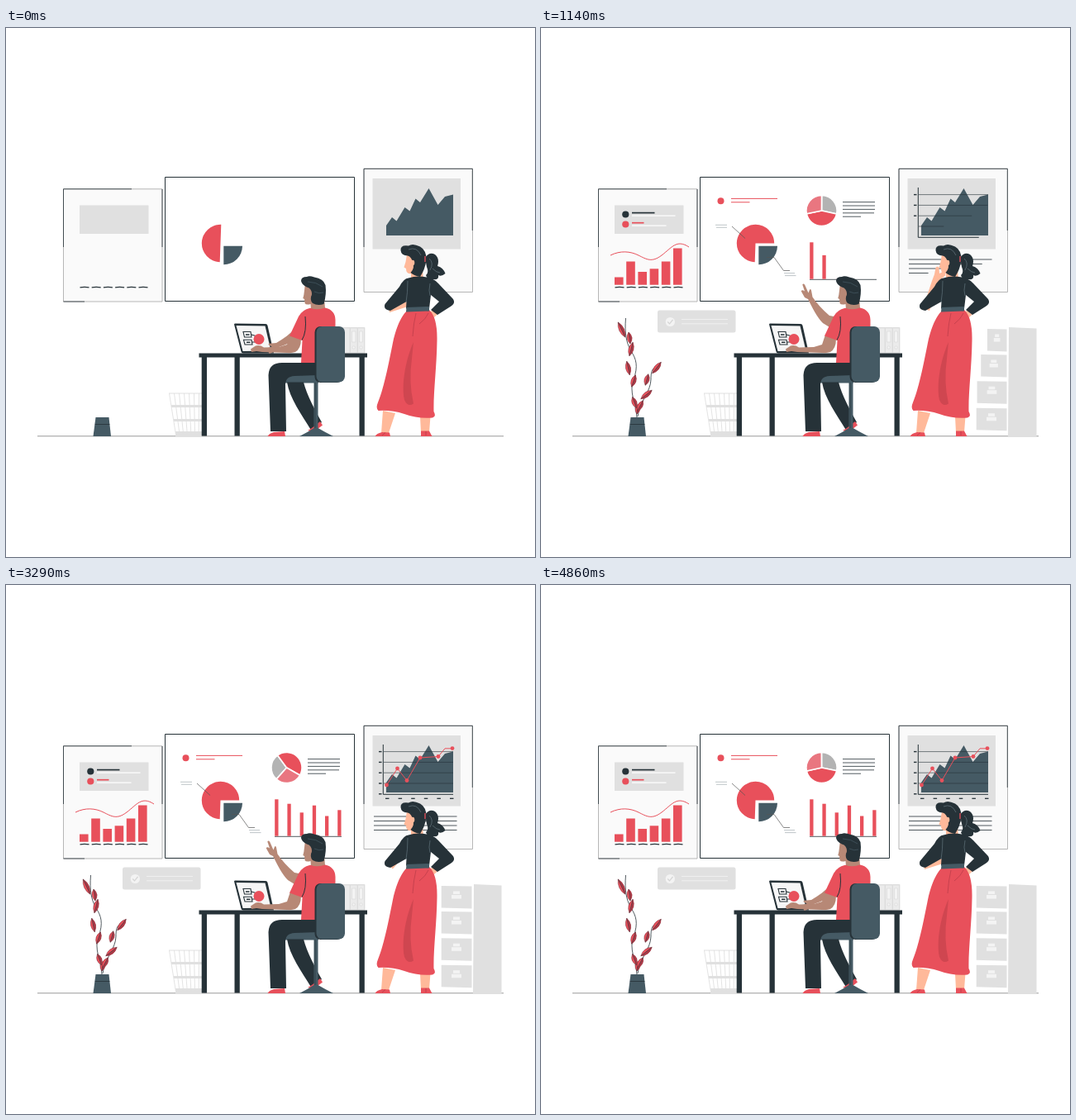
An HTML page for the animation above (4930 ms loop, 640x640 px).

```html
<!DOCTYPE html>
<html lang="en">
<head>
<meta charset="utf-8">
<title>Team reviewing charts</title>
<style>
html, body { margin: 0; width: 100%; height: 100%; overflow: hidden; background: #fff; }
svg { display: block; width: 100%; height: 100%; }
[data-fx] { transform-box: fill-box; }
[data-fx^=pop] { transform-origin: 50% 50%; }
[data-fx^=up] { transform-origin: 50% 100%; }
[data-fx^=right] { transform-origin: 0 50%; }
[data-fx^=left] { transform-origin: 100% 50%; }
.red { fill: #e8505b; } .ink { fill: #263238; } .slate { fill: #455a64; }
.grey { fill: #e0e0e0; } .pale { fill: #f3f3f3; } .skin { fill: #b78876; } .peach { fill: #ffb99a; }
.l { fill: none; stroke: #263238; stroke-width: .8; }
.lr { fill: none; stroke: #e8505b; stroke-width: 1; }
.lw { fill: none; stroke: #fff; stroke-width: 1.2; }
.lg { fill: none; stroke: #a3acb0; stroke-width: .7; }
</style>
</head>
<body>
<svg viewBox="0 0 640 640">
  <path d="M38 493.8H602" stroke="#9b9b9b" stroke-width="1"/>

  <g id="leftPoster">
    <path d="M69.5 194.8H189V331H69.5Z" fill="#fafafa" stroke="#a5a5a5" stroke-width=".8"/>
    <path class="l" d="M69.5 265V194.8H152M189 195V265M69.5 331H95"/>
    <path class="grey" d="M89 214.5H172.5V249H89Z"/>
    <circle class="ink" cx="102.3" cy="225.5" r="4.1" data-fx="pop 150 350"/>
    <path class="l" style="stroke-width:1.7" d="M110 223.6H137.5" data-fx="draw 250 500"/>
    <path class="lw" d="M110 227.2H162.5" data-fx="draw 480 800"/>
    <circle class="red" cx="102.3" cy="237.5" r="4.1" data-fx="pop 500 750"/>
    <path class="lr" style="stroke-width:1.7" d="M110 235.7H124.5" data-fx="draw 640 850"/>
    <path class="lw" d="M110 239.2H151.5" data-fx="draw 740 1060"/>
    <path class="lr" d="M84 275C96 269 108 270 118 275S134 284 146 275S164 255 179 265" data-fx="draw 60 680"/>
  </g>

  <g id="board">
    <path d="M192.5 180.5H421.5V330.5H192.5Z" fill="#fff" stroke="#263238"/>
    <circle class="red" cx="217.5" cy="209.3" r="4" data-fx="pop 70 300"/>
    <path class="lr" d="M230 206.4H286" data-fx="draw 100 480"/>
    <path class="lr" d="M230 210.8H252.5" data-fx="draw 200 480"/>
    <path class="red" id="bigPie"/>
    <path class="slate" d="M263.3 263.8H286A22.6 22.6 0 0 1 263.3 286.2Z"/>
    <path class="lg" style="stroke:#555" d="M247 254.5L231 240" data-fx="draw 640 900"/>
    <path class="lg" d="M225 238.3H211" data-fx="draw 800 1050"/>
    <path class="lg" d="M225 241.3H212" data-fx="draw 850 1100"/>
    <path class="lg" style="stroke:#555" d="M273 277.5H282L293.5 293.5H301" data-fx="draw 640 950"/>
    <path class="lg" d="M294 296.6H307" data-fx="draw 800 1050"/>
    <path class="lg" d="M295 299.6H308.500" data-fx="draw 850 1100"/>
    <g id="pie" stroke="#fff" stroke-width="1.7"></g>
    <path class="l" d="M325 304.3H406" data-fx="draw 150 640"/>
  </g>

  <g id="rightPoster">
    <path d="M433 170.3H564.500V319.500H433Z" fill="#fafafa" stroke="#a5a5a5" stroke-width=".8"/>
    <path class="l" d="M433 265V170.300H564.300V245"/>
    <path class="grey" d="M443.500 182H550V267.500H443.500Z"/>
    <path class="slate" d="M460 251V239L467 229L472.500 233.500L482.500 217L488.500 221.500L495.500 206.500L501 211L511.500 194L522.500 214L531 204L541 201.500V251Z"/>
    <path class="l" style="stroke-width:1" d="M456.300 193V253.300" data-fx="draw 700 1000"/>
    <path class="l" style="stroke-width:1" d="M456.300 253.300H541" data-fx="draw 800 1250"/>
  </g>

  <g data-fx="right 70 620">
    <rect class="grey" x="141" y="341.500" width="94.500" height="27" rx="2.500"/>
    <circle cx="156.300" cy="355.500" r="5.600" class="pale"/>
    <path d="M153.300 355.500L155.500 357.800L159.500 353" fill="none" stroke="#d5d5d5" stroke-width="1.200"/>
    <path d="M170 352.500H226M170 357.800H226" stroke="#efefef" stroke-width="1"/>
  </g>

  <path class="grey" d="M566 362L599.500 363.500V494.500H565Z" data-fx="up 400 1000"/>
  <g id="drawers"></g>

  <g id="bin" fill="none" stroke="#e0e0e0"></g>

  <g id="plant">
    <path class="l" d="M116 471C115 455 106 440 112 425C118 409 115 400 109 391C103 380 101 370 102.500 351" data-fx="draw 0 720"/>
    <path class="l" d="M117 470C119 452 133 440 133 425S137 413 142 406" data-fx="draw 100 680"/>
  </g>
  <path class="slate" d="M108.500 471H124.500L127 494H105.500Z"/>
  <path d="M107.800 479.500H125.400" stroke="#263238" stroke-width=".8"/>

  <g id="desk">
    <g class="pale" stroke="#dadada" stroke-width=".7">
      <path class="grey" d="M404 362.500H434V393H404Z"/>
      <path d="M406 363H416V393H406ZM416.500 363H425V393H416.500ZM425.500 363H433.500V393H425.500Z" fill="#ebebeb"/>
      <path d="M418.500 367H423V380H418.500ZM427.500 367H431.500V380H427.500Z"/>
      <circle cx="420.700" cy="386.500" r="1.700"/><circle cx="429.500" cy="386.500" r="1.700"/>
    </g>
    <path class="ink" d="M233.500 393.500H437V398.500H433.800V493.500H427.500V398.500H282.800V493.500H276.500V398.500H243V493.500H236.700V398.500H233.500Z"/>
    <path class="ink" d="M276 358.500Q276 357.500 277.500 357.500L314 358Q316 358 316.500 360L324 393.500H287Q285 393.500 284.500 391.500Z"/>
    <path d="M278.500 360L313.500 360.500L320.500 390.500L286.500 391Z" fill="#f6f6f6"/>
    <path class="l" d="M287 367.500H296L297 374H288.500ZM287.500 377.300H297L298 383H289ZM297 371L302 372.500M298 380H302" style="stroke-width:1.100"/>
    <path class="l" d="M290 371H294.500M291 380.300H295.500" style="stroke-width:1.400"/>
    <circle class="red" cx="306" cy="376.500" r="6.500"/>
  </g>

  <g id="man">
    <path class="skin" id="armMan" d="M360 350L349 348C341 341 334 334 328.500 325.500L327 317.500Q326 315 324.800 317L323.500 320.500L319.300 311Q317.500 308.500 316.300 310.500L319 318.500Q315.500 316 314.800 318.500L319 326L323 328C328 338 334 350 341 357L354 365Z"/>
    <path class="skin" d="M344 371L357 376Q357 388 350 392Q346 393.500 340 393L310 392L303 391L297 392L296 388.500L302 384.500Q307 383 312 386.500L330 386L340 383Z"/>
    <path class="slate" d="M338 420H378V429.500H338Z"/>
    <path class="ink" d="M340 428.500H360C364 444 374 463 382 477L369 486.500C358 468 343 448 340 428.500Z"/>
    <path class="red" d="M365 487L370 484L380 476L383 480.500Q377 486 371 488Z"/>
    <path class="ink" d="M378 405H334Q318 405 317.500 420L320 488H339L338 432Q338 421.500 349 421L378 420Z"/>
    <path class="red" d="M316.500 494Q318 490.500 324 489L337 488L338 494Z"/>
    <path class="skin" d="M362 309L360.300 323L359.300 327L361 328L361.500 333Q363 335.500 368.500 334L369 341Q378 345 386 339L384 315Z"/>
    <path class="red" d="M343 372.500L354 349Q358 341 368 338.700Q377 342 386 338.500Q398 341 398.500 353V370H377L375 405H357L358.500 378Z"/>
    <path class="l" d="M358 377.500Q364 368 362 349" style="stroke-width:1"/>
    <path class="ink" d="M357 306Q357 301 364 301Q367 299.500 373 301.500Q384 303 386.500 311Q388 322 384.500 334Q377 336.500 371 333Q367 329 370 322Q370 315 364 313.500Q358 311 357 306Z"/>
    <ellipse class="skin" cx="367" cy="322" rx="2.500" ry="3.500"/>
    <path d="M365 307Q375 307 383 313M373 319Q379 322 384 320" fill="none" stroke="#455a64" stroke-width=".7"/>
    <rect class="ink" x="373.500" y="361" width="34" height="68" rx="7"/>
    <rect class="slate" x="375.500" y="361" width="34.500" height="67.500" rx="7"/>
    <path class="slate" d="M372.500 428H377.500V484Q386 489 396 494H355Q365 489 372.500 484Z"/>
    <path class="l" d="M374 429V484" style="stroke-width:.6"/>
  </g>

  <g id="woman">
    <path class="peach" d="M456 463L471 466L463 490H454ZM501 470H513.500L512 489H502Z"/>
    <path class="red" d="M446.500 494Q448 490.500 455 489L464 489.500L465 494ZM502 494V487.500H512L515.500 494Z"/>
    <path d="M455 493L459 489.500M508 493V488" stroke="#b83c48" stroke-width=".8"/>
    <path class="peach" id="armWoman" d="M462 339L470 342L484 304L489.500 299Q489 295 486 295L482 297L481.500 290Q479.500 287.500 477.500 290L476 298L473 306Z"/>
    <path class="peach" d="M485 274L483.500 283L481.500 289.500L484 291Q484 298 490 297V304H505L503 280Z"/>
    <path class="peach" d="M526 336L511 344.500L518 350L528 341Z"/>
    <path class="red" d="M485 342L512 341Q522 350 521.500 378C521 412 517 440 517.500 464Q521 470 516 471.500Q498 473 482 467Q466 462 450.500 463Q447 460 450 453C458 434 464 400 469 376Q475 352 485 342Z"/>
    <path d="M493 380C484 400 478 430 482 450Q486 459 493 454.500Q487 428 491 400Z" fill="#cf4650"/>
    <path d="M496 345Q493 357 492 373M511 345Q508 352 500 358" fill="none" stroke="#b83c48" stroke-width=".7"/>
    <path class="ink" d="M487 302.500Q497 299 509 301.500Q518 303 523 309L541 328Q544 333 538.500 336.500L522 347L514 341L524 331L514 323L512 339.500H484L484.500 331L465 342Q456 341 458.500 334L476 313Q481 303 487 302.500Z"/>
    <path d="M486 306Q486 320 484 332M513 309Q511 318 513 324" fill="none" stroke="#61737c" stroke-width=".7"/>
    <path class="slate" d="M484.500 338L512 337V342.500L484 343.500Z"/>
    <path class="ink" d="M477.500 269Q477 262 487 263.500Q492 260 501 264.500Q509 269 508.500 281Q507 292 501 301Q494 300 489.500 296Q495 290 492 284Q491 277 486 275.500Q478 275 477.500 269Z"/>
    <ellipse class="peach" cx="492" cy="284" rx="2.300" ry="3.300"/>
    <path class="ink" d="M507 278Q512 270 519 274Q525 279 522 288Q529 290 531.500 297Q527 301 523 299Q524 305 517 304Q510 306 508 299Q512 296 509 289Z"/>
    <path d="M487 268Q497 264 502 275M512 279Q518 284 513 293M516 291Q521 296 525 296" fill="none" stroke="#65767e" stroke-width=".7"/>
    <path d="M507 276V283" stroke="#e8505b" stroke-width="1.300"/>
  </g>
</svg>
<script>
const LOOP = 4930, STEP = LOOP / 69;
const $ = id => document.getElementById(id);
const add = (id, markup) => $(id).insertAdjacentHTML('beforeend', markup);
const clamp = v => Math.min(1, Math.max(0, v));
const ramp = (t, a, b) => clamp((t - a) / (b - a));
const sine = p => (1 - Math.cos(Math.PI * p)) / 2;
const ease = (t, a, b) => sine(ramp(t, a, b));
const fx = (kind, start, length) => `data-fx="${kind} ${start} ${start + length}"`;

function sector(cx, cy, r, from, to) {
  const at = a => {
    const q = a * Math.PI / 180;
    return `${cx + r * Math.sin(q)} ${cy - r * Math.cos(q)}`;
  };
  return `M${cx} ${cy}L${at(from)}A${r} ${r} 0 ${+(to - from > 180)} 1 ${at(to)}Z`;
}

// Left poster bars
[301.5, 282.5, 295, 291.3, 282.5, 266.5].forEach((y, i) => {
  const x = 89 + 14.2 * i;
  add('leftPoster', `<rect class="red" x="${x}" y="${y}" width="10.6" height="${310.7 - y}" ${fx('up', 160 + 80 * i, 250)}/>
    <path class="l" style="stroke-width:1.2" d="M${x + .5} 313.8Q${x + 6} 313 ${x + 11.5} 313.8"/>`);
});

// Board: small pie, its text and the bar chart
[[0, 102, '#b3b3b3'], [102, 258, '#e8505b'], [258, 360, '#e97680']].forEach(([a, b, fill]) =>
  add('pie', `<path fill="${fill}" d="${sector(0, 0, 18.6, a, b)}"/>`));
[404, 404, 404, 403, 387].forEach((x, i) =>
  add('board', `<path class="l" d="M365 ${210.6 + 4.4 * i}H${x}" ${fx('draw', 380 + 90 * i, 250)}/>`));
const barStart = [600, 880, 1130, 1250, 1390, 1800];
[259.3, 264.7, 275.3, 266.7, 279.5, 272.3].forEach((y, i) =>
  add('board', `<rect class="red" x="${325.2 + 15.2 * i}" y="${y}" width="4.3" height="${303.7 - y}" ${fx('up', barStart[i], 400)}/>`));

// Right poster: grid, labels, trend line and text
for (let i = 0; i < 5; i++) {
  const y = 201.6 + 12.8 * i;
  add('rightPoster', `<path class="l" style="stroke-width:1.4" d="M451 ${y}H454.5" ${fx('draw', 880 + 90 * i, 100)}/>`);
  if (i < 4) add('rightPoster', `<path class="l" style="stroke-width:.6" d="M457 ${y}H541" ${fx('draw', 780 + 80 * i, 300)}/>`);
}
for (let i = 0; i < 6; i++)
  add('rightPoster', `<path class="l" style="stroke-width:1.3" d="M${459 + 15.6 * i} 258.3h4.5" ${fx('draw', 1480 + 130 * i, 100)}/>`);
add('rightPoster', '<path class="lr" d="M460.5 242L473.5 222L485 236.5L501 209L523 207.5L531 197.8H540" data-fx="drawOut 1300 2700"/>');
const dotStart = [1300, 1430, 1570, 1830, 2130, 2450];
[[460.5, 242], [473.5, 222], [485, 236.5], [501, 209], [523, 207.5], [540, 197.6]].forEach(([x, y], i) =>
  add('rightPoster', `<circle class="red" cx="${x}" cy="${y}" r="2.4" ${fx('pop', dotStart[i], 160)}/>`));
for (let i = 0; i < 4; i++)
  add('rightPoster', `<path class="l" d="M445 ${280 + 5.5 * i}H545.5" ${fx('draw', 680 + 90 * i, 420 + 60 * i)}/>`);

// Cabinet drawers, top to bottom
[364, 395, 427.3, 459.8].forEach((y, i) =>
  add('drawers', `<g ${fx('left', 895 - 65 * i, 420)}>
    <path class="grey" d="M526.7 ${y}L563.5 ${y + .5}V${y + 27.5}L526.7 ${y + 26.5}Z"/>
    <path class="pale" d="M541 ${y + 6.5}h8v3.500h-8zM539 ${y + 11}h12v4.500h-12z"/></g>`));

// Waste bin lattice
for (let i = 0; i < 8; i++)
  add('bin', `<path d="M${197.5 + 6 * i} 442L${205.5 + 4.6 * i} 492" stroke-width=".9"/>`);
add('bin', '<path d="M197 442H237" stroke-width="1"/><path d="M200 457.500H237M203 474.500H237" stroke-width="3"/><path d="M205 491H237" stroke-width="6"/>');

// Leaves: x, y, angle, half length, start
[[117, 461, 10, 6, 100], [113, 453, -20, 7, 130], [120, 457, 28, 7, 150], [127.500, 443.500, 52, 8.500, 330],
 [128, 425.500, 15, 7, 600], [140, 411, 38, 8.500, 560], [112, 427, 18, 7.500, 200], [105.500, 411.500, -12, 8.500, 260],
 [109, 388.500, 14, 8.500, 360], [107, 375, -8, 7, 480], [97.500, 365, -25, 10, 420]
].forEach(([x, y, a, r, start]) =>
  add('plant', `<g transform="translate(${x} ${y}) rotate(${a})"><g ${fx('pop', start, 420)}>
    <path class="red" d="M0 ${-r}Q6 0 0 ${r}Q-6 0 0 ${-r}Z" stroke="#7c2f3a" stroke-width=".5"/>
    <path fill="#a93a47" d="M0 ${-r}Q6 0 0 ${r}Z"/><path class="l" style="stroke-width:.5" d="M0 ${-r}V${r}"/></g></g>`));

const parts = [...document.querySelectorAll('[data-fx]')].map(el => {
  const [kind, start, end] = el.dataset.fx.split(' ');
  if (kind.startsWith('draw')) {
    el.setAttribute('pathLength', 1);
    el.style.strokeDasharray = '1 2';
  }
  return { el, kind, start: +start, end: +end };
});

function draw(t) {
  for (const { el, kind, start, end } of parts) {
    const raw = ramp(t, start, end), p = kind === 'drawOut' ? raw * (2 - raw) : sine(raw);
    el.style.visibility = p > .001 ? 'visible' : 'hidden';
    if (kind.startsWith('draw')) el.style.strokeDashoffset = 1 - p;
    else el.style.transform = kind === 'pop' ? `scale(${p})` : kind === 'up' ? `scaleY(${p})` : `scaleX(${p})`;
  }
  $('bigPie').setAttribute('d', sector(259.5, 260.5, 22.7, 182, 362 + 88 * ease(t, 0, 1000)));
  $('pie').setAttribute('transform',
    `translate(339.5 221) rotate(${360 * ease(t, 1070, LOOP)}) scale(${ease(t, 280, 700)})`);
  const point = ease(t, 0, 695) - ease(t, 3300, 4560);
  $('armMan').setAttribute('transform', `rotate(${-85 * (1 - point)} 358 354)`);
  const think = ease(t, 0, 570) - ease(t, 2930, 3750);
  $('armWoman').setAttribute('transform', `rotate(${52 * (1 - think)} 465 337)`);
}

// The picture advances 14 times a second
function tick() {
  const t = performance.now() % LOOP;
  draw(Math.floor((t + 3) / STEP) % 69 * STEP);
  requestAnimationFrame(tick);
}
tick();
</script>
</body>
</html>
```
